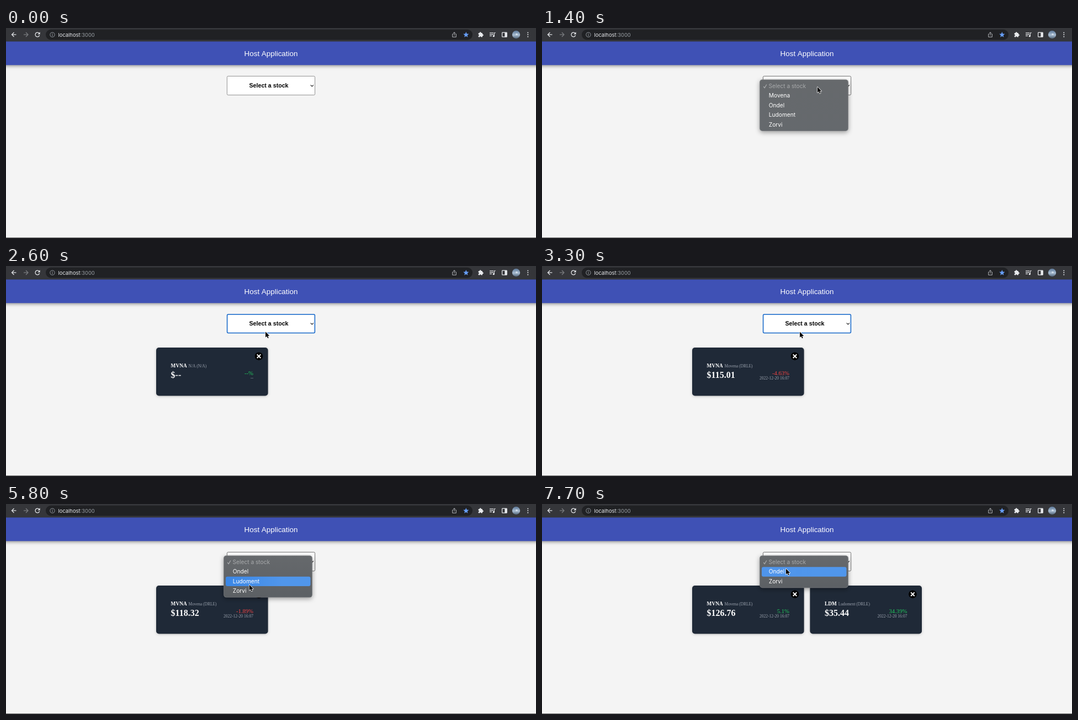
An HTML page with a canvas that plays this animation: 960 by 381 pixels, repeating every 8 s.

```html
<!DOCTYPE html>
<html lang="en">
<head>
<meta charset="utf-8">
<title>Host Application</title>
<style>
html, body { margin: 0; width: 100%; height: 100%; overflow: hidden; background: #f4f4f4; }
canvas { display: block; width: 960px; height: 381px; }
</style>
</head>
<body>
<canvas id="stage"></canvas>
<script>
const W = 960, H = 381, LOOP = 8000, STEP = 100;
const SANS = '"Liberation Sans", Arial, sans-serif';
const UI = 'Inter, Roboto, sans-serif';
const SERIF = '"Liberation Serif", "Times New Roman", serif';
const RED = '#ef4444', GREEN = '#22c55e', GRAY = '#9ca3af';
const STAMP = '2022-12-20 16:07';

const canvas = document.getElementById('stage');
const ctx = canvas.getContext('2d');
const ratio = window.devicePixelRatio || 1;
canvas.width = W * ratio;
canvas.height = H * ratio;

// Pointer path: time, x, y
const PATH = [
  [400, 940, 306], [600, 583, 246], [700, 583, 246], [1100, 499, 107],
  [1700, 499, 107], [1900, 470, 119.3], [3200, 470, 119.3], [3300, 467, 119.5],
  [3400, 458, 118], [3600, 458, 118], [4000, 457.8, 113.5], [5400, 457.8, 113.5],
  [5800, 440.7, 146.5], [6100, 440.7, 146.5], [6300, 445.6, 125],
  [6800, 442, 111.5], [7400, 442, 111.5], [7700, 442, 117.5]
];

const MENUS = [
  { from: 1400, to: 2500, blink: 2300, items: ['Movena', 'Ondel', 'Ludoment', 'Zorvi'] },
  { from: 5100, to: 6300, blink: 6100, items: ['Ondel', 'Ludoment', 'Zorvi'] },
  { from: 7100, to: LOOP, blink: -1, items: ['Ondel', 'Zorvi'] }
];
const MENU = { x: 394.2, y: 93.4, w: 160.6, first: 96.8, row: 17.35 };

const EMPTY = { name: 'N/A (N/A)', price: '$--', change: '--%', date: '--', color: GREEN };
const quote = (name, price, change) => ({
  name: name + ' (DRLE)', price: '$' + price, change: change + '%', date: STAMP,
  color: change < 0 ? RED : GREEN
});
const CARDS = [
  { x: 272, ticker: 'MVNA', states: [
    [2500, EMPTY],
    [2700, quote('Movena', '115.01', '-4.63')],
    [4700, quote('Movena', '118.32', '-1.89')],
    [6700, quote('Movena', '126.76', '5.1')]] },
  { x: 485.4, ticker: 'LDM', states: [
    [6300, EMPTY],
    [6500, quote('Ludoment', '35.44', '34.39')]] }
];

function box(x, y, w, h, r, fill) {
  ctx.beginPath();
  ctx.roundRect(x, y, w, h, r);
  if (fill) { ctx.fillStyle = fill; ctx.fill(); }
}

function stroke(color, width) {
  ctx.strokeStyle = color;
  ctx.lineWidth = width;
  ctx.stroke();
}

function line(points, color, width, close) {
  ctx.beginPath();
  points.forEach(([x, y]) => ctx.lineTo(x, y));
  if (close) ctx.closePath();
  stroke(color, width);
}

function disc(x, y, r, fill) {
  ctx.beginPath();
  ctx.arc(x, y, r, 0, Math.PI * 2);
  if (fill) { ctx.fillStyle = fill; ctx.fill(); }
}

function text(str, x, y, font, color, align = 'left') {
  ctx.font = font;
  ctx.fillStyle = color;
  ctx.textAlign = align;
  ctx.fillText(str, x, y);
}

function shaded(color, blur, dy, draw) {
  ctx.save();
  ctx.shadowColor = color;
  ctx.shadowBlur = blur * ratio;
  ctx.shadowOffsetY = dy * ratio;
  draw();
  ctx.restore();
}

function star(x, y, r, color) {
  ctx.beginPath();
  for (let i = 0; i < 10; i++) {
    const a = -Math.PI / 2 + i * Math.PI / 5, d = i % 2 ? r * 0.45 : r;
    ctx.lineTo(x + d * Math.cos(a), y + d * Math.sin(a));
  }
  ctx.closePath();
  ctx.fillStyle = color;
  ctx.fill();
}

function arrow(x, dir, color) {
  line([[x - 4 * dir, 12], [x + 4 * dir, 12]], color, 1.2);
  line([[x, 8], [x + 4 * dir, 12], [x, 16]], color, 1.2);
}

function toolbar() {
  const light = '#e8eaed';
  box(0, 0, W, 24.5, 0, '#35363a');
  box(72, 2.8, 773, 18.6, 9.3, '#202124');
  arrow(14.5, -1, light);
  arrow(36, 1, '#7d7f83');

  ctx.beginPath();
  ctx.arc(57, 12, 3.9, 0.35, 5.5);
  stroke(light, 1.3);
  ctx.beginPath();
  ctx.moveTo(61.6, 7.3);
  ctx.lineTo(61.6, 11.4);
  ctx.lineTo(57.5, 11.4);
  ctx.fillStyle = light;
  ctx.fill();

  disc(84, 12.2, 4.1);
  stroke('#9aa0a6', 0.9);
  box(83.5, 11.5, 1, 3, 0, '#9aa0a6');
  box(83.5, 9.8, 1, 1, 0, '#9aa0a6');

  text('localhost', 94.5, 15.5, '9.4px ' + UI, light);
  text(':3000', 94.5 + ctx.measureText('localhost').width, 15.5, '9.4px ' + UI, '#9aa0a6');

  line([[810, 11], [808.7, 11], [808.7, 16.3], [815.3, 16.3], [815.3, 11], [814, 11]], '#c4c7cb', 0.9);
  line([[812, 13.5], [812, 7.8]], '#c4c7cb', 0.9);
  line([[810, 9.8], [812, 7.7], [814, 9.8]], '#c4c7cb', 0.9);
  star(833.3, 12.4, 5.3, '#669df6');

  box(855.6, 9, 7.4, 7.6, 1, light);
  disc(859.2, 8.7, 1.5, light);
  disc(863.3, 12.7, 1.5, light);
  disc(855.7, 12.9, 1.2, '#35363a');
  disc(859.3, 16.5, 1.2, '#35363a');

  [[8.3, 7], [11, 7], [13.7, 4]].forEach(([y, w]) => box(876, y, w, 1.2, 0, light));
  disc(883.3, 14.7, 1.6, light);
  line([[884.4, 14.7], [884.4, 8.8], [886.8, 8.8]], light, 1.1);

  box(898.6, 8.2, 8.6, 8, 0.8);
  stroke(light, 1.2);
  box(903.4, 8.2, 3.8, 8, 0, light);

  const sky = ctx.createLinearGradient(0, 5, 0, 19);
  sky.addColorStop(0, '#5d7898');
  sky.addColorStop(0.55, '#a9bdd2');
  sky.addColorStop(1, '#54677c');
  disc(924, 12, 7.2, sky);
  disc(925, 11.5, 1.8, 'rgba(240,246,252,.65)');
  [8.4, 12.1, 15.8].forEach(y => disc(945.3, y, 1, light));
}

function header() {
  shaded('rgba(0,0,0,.42)', 6, 1.6, () => box(-12, 24, W + 24, 43.2, 0, '#3f51b5'));
  text('Host Application', 480, 50.6, '13.4px ' + SANS, '#fff', 'center');
  toolbar();
}

function select(focused, hovered) {
  box(400.4, 87.4, 159.2, 34.2, 2, '#fff');
  if (focused) {
    box(400.6, 87.7, 158.8, 33.8, 2);
    stroke('#1064c8', 1.5);
  } else {
    stroke(hovered ? '#4f4f4f' : '#767676', 0.8);
  }
  text('Select a stock', 476, 108.4, 'bold 10.67px ' + SANS, '#000', 'center');
  line([[551.7, 103.3], [554.3, 106], [556.9, 103.3]], '#222', 1.1);
}

function card({ x, ticker, states }, t, closable) {
  const state = states.filter(([at]) => t >= at).pop();
  if (!state) return;
  const { name, price, change, date, color } = state[1];
  const left = x + 26.6, right = x + 176;
  shaded('rgba(0,0,0,.22)', 4, 1, () => box(x, 148, 202.6, 87.5, 5, '#1f2937'));
  text(ticker, left, 184.2, 'bold 9.33px ' + SERIF, '#fff');
  const gap = ctx.measureText(ticker).width + 2.9;
  text(name, left + gap, 184.2, '7.5px ' + SERIF, GRAY);
  text(price, left, 203.4, 'bold 16px ' + SERIF, '#fff');
  text(change, right, 197.6, '10.67px ' + SERIF, color, 'right');
  text(date, right, 206.3, '7.5px ' + SERIF, GRAY, 'right');
  const cx = x + 186, cy = 163.7, d = 3.3;
  disc(cx, cy, 7.3, '#000');
  line([[cx - d, cy - d], [cx + d, cy + d]], '#fff', 2);
  line([[cx + d, cy - d], [cx - d, cy + d]], '#fff', 2);
}

function menu({ items, blink }, t, y) {
  const { x, y: top, w, first, row } = MENU;
  const h = row * (items.length + 1) + 6.8;
  const tint = ctx.createLinearGradient(0, top, 0, top + h);
  tint.addColorStop(0, '#66696c');
  tint.addColorStop(1, t > 5000 ? '#5c6064' : '#65696d');
  shaded('rgba(0,0,0,.38)', 9, 2.5, () => box(x, top, w, h, 5, tint));
  box(x + 0.4, top + 0.4, w - 0.8, h - 0.8, 4.6);
  stroke('rgba(255,255,255,.14)', 0.8);

  const picked = Math.floor((y - first) / row);
  if (picked > 0 && picked <= items.length && t !== blink) {
    const glow = ctx.createLinearGradient(398, 0, 500, 0);
    glow.addColorStop(0, picked === 2 ? '#3b87e6' : '#4f95ec');
    glow.addColorStop(1, '#5096eb');
    box(398, first + row * picked + 0.2, 153.5, row, 3, glow);
  }

  const font = '10.2px ' + UI;
  line([[401.2, 106.2], [403.2, 108.7], [406.8, 102.4]], '#b0b2b4', 1.1);
  text('Select a stock', 410.5, 109.1, font, '#a8aaac');
  items.forEach((item, i) => text(item, 410.8, 109.1 + row * (i + 1), font, '#fff'));
}

function pointerAt(t) {
  if (t < PATH[0][0]) return null;
  const i = PATH.findIndex(([at]) => at > t);
  if (i < 0) return PATH[PATH.length - 1].slice(1);
  const [t0, x0, y0] = PATH[i - 1], [t1, x1, y1] = PATH[i];
  const k = (t - t0) / (t1 - t0);
  return [x0 + (x1 - x0) * k, y0 + (y1 - y0) * k];
}

function pointer([x, y]) {
  const shape = [[0, 0], [0, 10.3], [2.4, 8.1], [4, 11.8], [5.7, 11.1], [4.1, 7.5], [7.3, 7.5]];
  ctx.lineJoin = 'round';
  line(shape.map(([dx, dy]) => [x + dx, y + dy]), '#fff', 1.4, true);
  ctx.fillStyle = '#000';
  ctx.fill();
  ctx.lineJoin = 'miter';
}

function draw(t) {
  ctx.setTransform(ratio, 0, 0, ratio, 0, 0);
  box(0, 0, W, H, 0, '#f4f4f4');
  box(0, 380, W, 1, 0, '#6a6a6a');
  header();
  const at = pointerAt(t);
  const open = MENUS.find(m => t >= m.from && t < m.to);
  const hovered = open || (at && at[0] > 400 && at[0] < 560 && at[1] > 87 && at[1] < 122);
  select(t >= MENUS[0].to && !open, hovered);
  CARDS.forEach(c => card(c, t));
  if (open) menu(open, t, at[1]);
  if (at) pointer(at);
}

const start = performance.now();
function tick() {
  const t = (performance.now() - start) % LOOP;
  draw(Math.floor(t / STEP) * STEP);
  requestAnimationFrame(tick);
}
tick();
</script>
</body>
</html>
```
